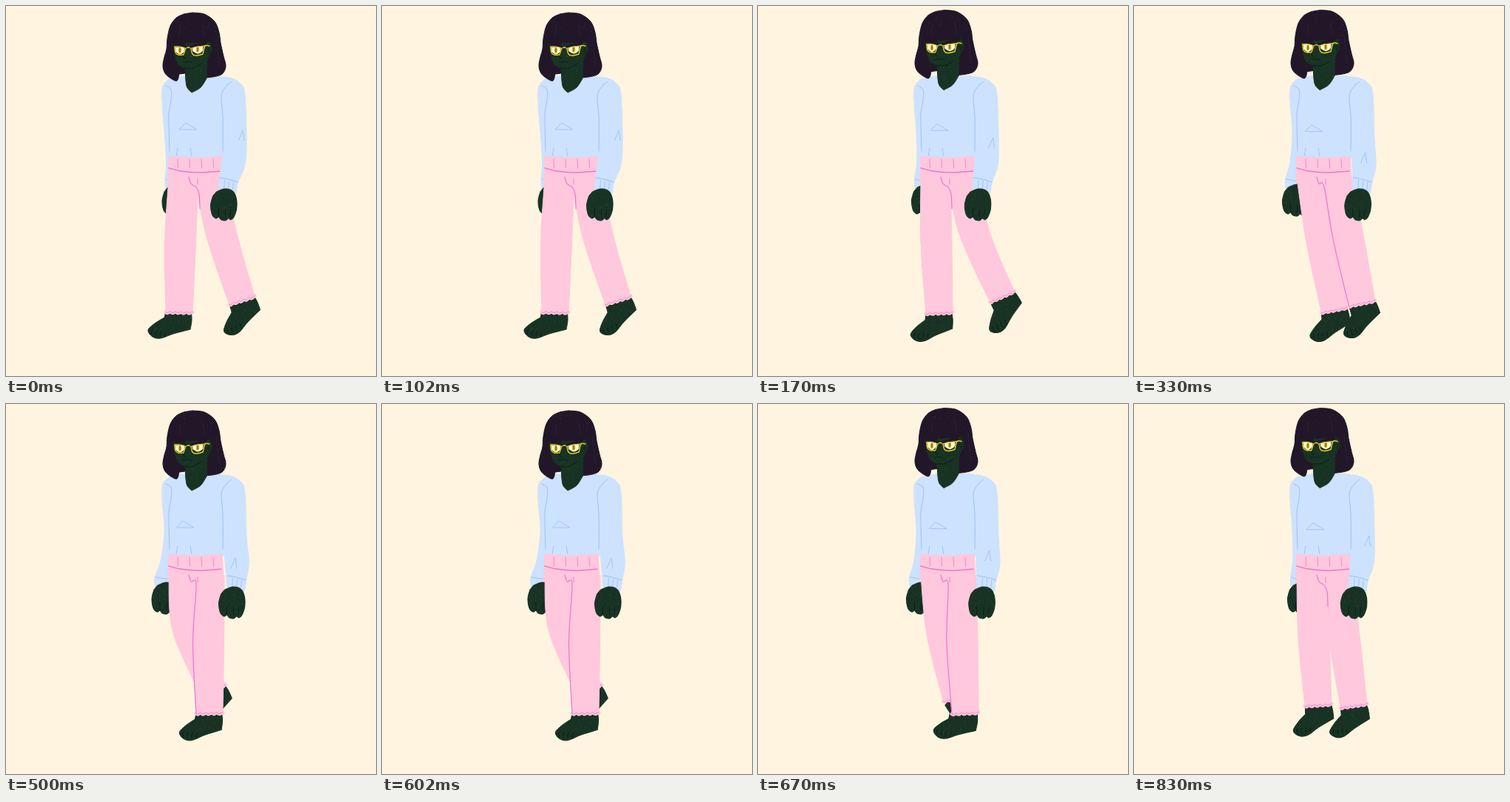
Write an HTML page with a canvas that moves like this. It is 500x500 px and loops after 1 s.

```html
<!DOCTYPE html>
<html lang="en">
<head>
<meta charset="utf-8">
<title>Walk cycle</title>
<style>
html, body { margin: 0; width: 100%; height: 100%; overflow: hidden; background: #fff4e0; }
canvas { display: block; width: 100vmin; height: 100vmin; }
</style>
</head>
<body>
<canvas id="stage" width="500" height="500"></canvas>
<script>
const ctx = document.getElementById('stage').getContext('2d');
const C = {
  paper: '#fff4e0', hair: '#211729', skin: '#183223', crease: '#0a1d12', sheen: '#365a45',
  knit: '#cce2fe', seam: '#9fc0f3', cloth: '#ffc8dc', glow: '#ffe0e8', pink: '#f470d2', frame: '#e9c51f'
};
const ends = [170, 330, 500, 670, 830, 1000];

// Ankle x, y and toe angle in degrees for each pose of the stride.
const legs = {
  left: { hip: 241, keys: [[234, 414, 28], [245, 415, 35], [271, 411, 45], [280, 387, 62], [268, 398, 75], [249, 407, 44]] },
  right: { hip: 276, keys: [[319, 398, 58], [330, 393, 68], [308, 402, 58], [275, 418, 31], [280, 418, 26], [297, 408, 46]] }
};

let seed = 1;
const rand = () => (seed = (seed * 16807) % 2147483647) / 2147483647;

// Catmull-Rom through "x y x y"; "/" marks a corner.
function trace(text) {
  const path = new Path2D();
  let last = null;
  for (const run of text.split('/')) {
    const n = run.trim().split(/\s+/).map(Number), pts = last ? [last] : [];
    for (let i = 0; i < n.length; i += 2) pts.push([n[i], n[i + 1]]);
    if (!last) path.moveTo(...pts[0]);
    for (let i = 0; i < pts.length - 1; i++) {
      const b = pts[i], c = pts[i + 1], a = pts[i - 1] || b, d = pts[i + 2] || c;
      path.bezierCurveTo(b[0] + (c[0] - a[0]) / 6, b[1] + (c[1] - a[1]) / 6,
        c[0] - (d[0] - b[0]) / 6, c[1] - (d[1] - b[1]) / 6, c[0], c[1]);
    }
    last = pts[pts.length - 1];
  }
  return path;
}

function shape(text, color) {
  const path = trace(text);
  path.closePath();
  ctx.fillStyle = ctx.strokeStyle = color;
  ctx.lineWidth = 1;
  ctx.fill(path);
  ctx.stroke(path);
  return path;
}

// ";" starts a new stroke.
function line(text, color, width = 1) {
  ctx.strokeStyle = color;
  ctx.lineWidth = width;
  for (const part of text.split(';')) ctx.stroke(trace(part));
}

function grain(path, color, x, y, w, h, count) {
  ctx.save();
  ctx.clip(path);
  ctx.globalAlpha = 0.55;
  ctx.fillStyle = color;
  for (let i = 0; i < count; i++) ctx.fillRect(x + rand() * w, y + rand() * h, 0.8, 0.8 + rand());
  ctx.restore();
}

function at(x, y, angle, paint) {
  ctx.save();
  ctx.translate(x, y);
  ctx.rotate(angle);
  paint();
  ctx.restore();
}

function foot() {
  const path = shape('-17 -5 / 16 -6 / 17 10 15 23 / -8 29 -25 35 -36 33 -42 24 -33 15 -20 7', C.skin);
  grain(path, C.sheen, -43, -5, 60, 40, 80);
  for (let i = 0; i < 4; i++) line(`${i * 6 - 36} ${23 + i} ${i * 6 - 38} ${27 + i} ${i * 6 - 37} ${30 + i}`, C.crease, 0.9);
}

function hand() {
  const path = shape('-10 -18 1 -22 12 -19 17 -8 17 6 13 17 9 20 / 6 18 / 2 21 -4 20 / -7 16 / -11 18 -16 13 -18 0 -15 -12', C.skin);
  grain(path, C.sheen, -18, -22, 36, 44, 70);
  line('-7 5 -7 15;2 6 2 16;9 6 8 15', C.crease, 0.9);
}

function hem(x0, y0, x1, y1) {
  const n = 18, pts = [];
  for (let i = 0; i <= n; i++) pts.push(x0 + (x1 - x0) * i / n, y0 + (y1 - y0) * i / n + Math.sin(i * 1.7));
  line(pts.join(' '), C.cloth, 5);
  line(pts.join(' '), C.pink, 0.8);
}

// Draws one leg and returns its left edge, from the knee down.
function leg({ hip, keys }, i) {
  const [x, y, toe] = keys[i];
  at(x, y, (28 - toe) * Math.PI / 180, foot);
  const lift = Math.max(0, 402 - y);
  const kx = (hip + x) / 2 - 2 - lift * 0.8, ky = (228 + y) / 2;
  const tilt = Math.atan2(x - kx, y - ky);
  const dx = 18 * Math.cos(tilt), dy = -18 * Math.sin(tilt);
  const shin = `${kx - 21} ${ky} ${x - dx} ${y - dy}`;
  const path = shape(`${hip - 21} 232 ${shin} / ${x + dx} ${y + dy} / ${kx + 21} ${ky} ${hip + 19} 232`, C.cloth);
  grain(path, C.glow, 211, 230, 130, 185, 60);
  hem(x - dx, y - dy, x + dx, y + dy);
  return shin;
}

function pants(i) {
  leg(legs.left, i);
  const inseam = leg(legs.right, i);
  shape('220 203 255 205 292 203 / 294 236 / 262 262 / 219 238', C.cloth);
  const gap = Math.abs(legs.left.keys[i][0] - legs.right.keys[i][0]);
  line('247 231 250 240 257 245 ' + (gap < 40 ? inseam : '261 254 262 274'), C.pink, 1.2);
  line('259 234 259 241', C.pink, 0.9);
  line('220 219 236 223 260 225 291 223', C.pink, 1.4);
  for (let x = 232; x < 285; x += 16) line(`${x} 207 ${x + 0.5} 219`, C.pink, 0.8);
}

function rightArm(wx, swing) {
  shape(`287 96 303 97 317 105 323 121 325 180 ${(wx + 346) / 2} 215 ${wx + 14} 238 ${wx + 12} 253 / ${wx} 251 ${wx - 12} 247 / ${(wx + 282) / 2} 215 294 190 292 125`, C.knit);
  line(`${wx - 11} 232 ${wx} 234 ${wx + 14} 238`, C.seam);
  for (let k = -4; k < 10; k += 6) line(`${wx + k} ${236 + k / 4} ${wx + k - 1} 248`, C.seam, 0.9);
  const ex = 313 + 5 * swing, ey = 193 - 20 * swing;
  line(`${ex - 4} ${ey + 9} ${ex + 2} ${ey - 5} / ${ex + 4} ${ey + 9}`, C.seam, 0.9);
}

function torso(swing) {
  shape('220 99 243 94 / 250 112 / 270 95 / 290 95 306 103 / 295 130 294 205 / 220 205 / 219 150 214 108', C.knit);
  const x = 243 + 2 * swing, y = 157 + 4 * rand();
  line(`${x - 11} ${y + 9} ${x - 2} ${y} / ${x + 13} ${y + 9} / ${x - 10} ${y + 9}`, C.seam, 0.9);
  line('230 203 232 192;251 203 249 192', C.seam, 0.9);
}

function eye(x, y, w) {
  shape(`${x - w} ${y - 4} / ${x + w} ${y - 4} / ${x + w - 1} ${y + 2} ${x} ${y + 5} ${x - w + 1} ${y + 2}`, '#fdf9da');
  ctx.fillStyle = '#d9b52c';
  ctx.beginPath();
  ctx.ellipse(x, y, 2.3, 3.8, 0, 0, 7);
  ctx.fill();
  line(`${x} ${y - 3} ${x} ${y + 2}`, '#4b421c', 1);
}

function head() {
  const hair = shape('252 9 268 11 282 21 288 36 290 50 294 68 297 81 293 91 284 95 270 97 / 242 91 / 234 92 / 231 101 223 98 215 91 212 81 214 69 217 58 218 44 222 27 230 16 240 11', C.hair);
  grain(hair, '#4b3c57', 212, 9, 85, 42, 70);
  const face = shape('226 46 / 270 46 / 276 51 278 58 275 66 272 72 / 271 98 / 263 110 251 117 / 244 108 242 84 / 233 79 228 66', C.skin);
  grain(face, C.sheen, 226, 48, 52, 70, 110);
  shape('222 32 / 274 32 / 273 47 / 269 50 256 49 / 246 50 / 244 42 / 242 51 225 50', C.hair);
  eye(235, 60, 6);
  eye(259, 59, 7);
  line('228 55 / 229 63 233 66 240 66 / 243 57 247 56 250 57 / 252 65 257 67 266 65 / 269 54 275 54', C.frame, 1.5);
  line('228 55 235 55 243 57;250 57 260 55 269 54', C.frame, 1.2);
  line('227 51 235 52 243 55;250 55 260 52 270 50', C.hair, 3.2);
  line('242 64 240 70 243 71;239 76 245 75 251 76;272 59 275 58 274 64;242 84 253 84 264 78', C.crease, 0.9);
  line('236 27 234 42;266 24 268 42;284 44 288 80', '#30213a', 0.9);
}

function draw(i) {
  seed = 101 + i * 37;
  const phase = i * Math.PI / 3, swing = Math.cos(phase);
  const bob = 2.3 * Math.cos(2 * phase) - 2.3;
  const farX = 206 + 7 * swing, nearX = 300 - 5.5 * swing;
  ctx.fillStyle = C.paper;
  ctx.fillRect(0, 0, 500, 500);
  shape(`221 99 212 108 211 130 214 170 ${(farX + 220) / 2} 210 ${farX + 2} 235 ${farX + 3} 248 / 224 250 / 224 108`, C.knit);
  line(`${farX + 3} 234 222 237`, C.seam, 0.9);
  at(farX + 16, 263, 0, hand);
  torso(swing);
  pants(i);
  rightArm(nearX + 5, swing);
  at(nearX, 269, 0, hand);
  line('305 102 297 109 291 122 293 150 293 196;216 108 223 113 223 128 220 148 221 196', C.seam);
  at(0, bob, 0, head);
}

ctx.lineCap = ctx.lineJoin = 'round';
let shown = -1;
function tick(now) {
  const i = ends.findIndex(end => now % 1000 < end);
  if (i !== shown) draw(shown = i);
  requestAnimationFrame(tick);
}
tick(performance.now());
</script>
</body>
</html>
```
